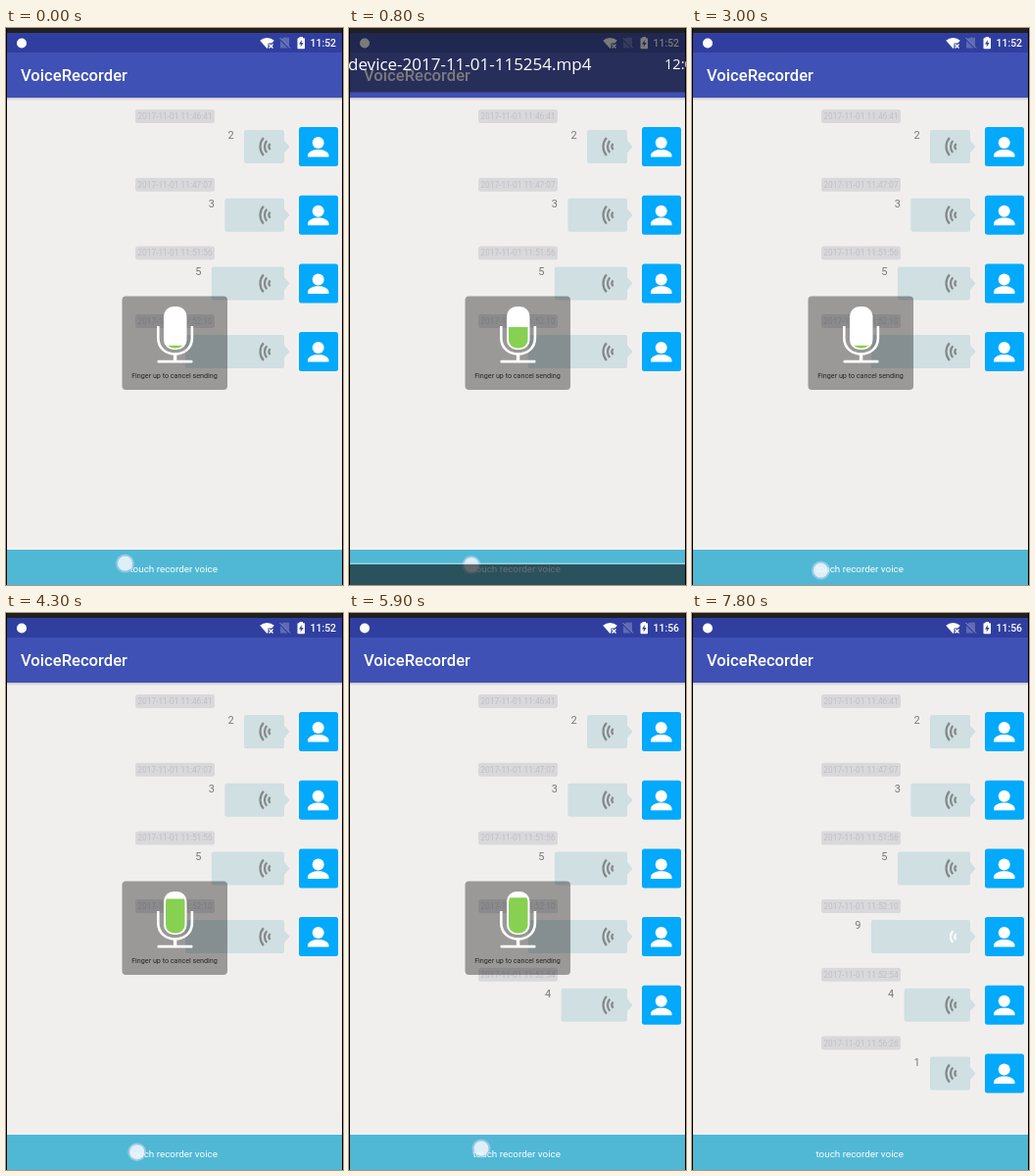
An HTML page with a canvas that plays this animation: 344x568 px, repeating every 8000 ms.

```html
<!DOCTYPE html>
<html lang="en">
<head>
<meta charset="utf-8">
<title>VoiceRecorder</title>
<style>
  html, body { margin: 0; width: 100%; height: 100%; overflow: hidden; background: #000; }
  canvas { display: block; width: 344px; height: 568px; }
</style>
</head>
<body>
<canvas id="stage"></canvas>
<script>
const W = 344, H = 568, LOOP = 8000, TICK = 100;
const canvas = document.getElementById('stage');
const ctx = canvas.getContext('2d');
const dpr = window.devicePixelRatio || 1;
canvas.width = W * dpr;
canvas.height = H * dpr;

// phase: how far the voice swell has come when the recording starts
const recordings = [
  { start: 0, end: 4600, phase: 0 },
  { start: 5100, end: 6000, phase: 620 }
];
const messages = [
  { date: '2017-11-01 11:46:41', seconds: 2, from: 0 },
  { date: '2017-11-01 11:47:07', seconds: 3, from: 0 },
  { date: '2017-11-01 11:51:56', seconds: 5, from: 0 },
  { date: '2017-11-01 11:52:10', seconds: 9, from: 0 },
  { date: '2017-11-01 11:52:54', seconds: 4, from: recordings[0].end },
  { date: '2017-11-01 11:56:26', seconds: 1, from: recordings[1].end }
];
const taps = [{ row: 1, at: 6700 }, { row: 3, at: 7100 }];

const clamp = v => Math.max(0, Math.min(1, v));
const rowY = i => 121 + i * 69.7;
const voiceLevel = ms => .07 + .83 * Math.sin(Math.PI * ms / 3000) ** 2;
const playerAlpha = t => clamp(Math.min((t - 300) / 100, (1200 - t) / 300));

function finger(t) {
  const k = clamp((t - 500) / 4600);
  return [121.5 + 13.5 * Math.sqrt(k), 546 + 7 * Math.sin(Math.PI * k)];
}

function rect(x, y, w, h, color, r = 0) {
  ctx.fillStyle = color;
  ctx.beginPath();
  ctx.roundRect(x, y, w, h, r);
  ctx.fill();
}

function poly(points, color) {
  ctx.fillStyle = color;
  ctx.beginPath();
  points.forEach(([x, y]) => ctx.lineTo(x, y));
  ctx.fill();
}

function disc(x, y, r, color) {
  ctx.fillStyle = color;
  ctx.beginPath();
  ctx.arc(x, y, r, 0, Math.PI * 2);
  ctx.fill();
}

function line(x1, y1, x2, y2, color, width) {
  ctx.strokeStyle = color;
  ctx.lineWidth = width;
  ctx.beginPath();
  ctx.moveTo(x1, y1);
  ctx.lineTo(x2, y2);
  ctx.stroke();
}

function text(str, x, y, size, color, align = 'left', weight = 400, family = 'Roboto') {
  ctx.font = `${weight} ${size}px ${family}, sans-serif`;
  ctx.textAlign = align;
  ctx.fillStyle = color;
  ctx.fillText(str, x, y);
}

function statusBar(t) {
  const bar = '#303f9f';
  rect(1, 5, 342, 20, bar);
  disc(16, 15.5, 5, '#fff');

  // Wi-Fi
  ctx.fillStyle = '#fff';
  ctx.beginPath();
  ctx.moveTo(266.5, 21);
  ctx.arc(266.5, 21, 11, -Math.PI * .73, -Math.PI * .27);
  ctx.fill();
  rect(267.5, 15.5, 6, 6, bar);
  line(268.5, 16.5, 272.5, 20.5, '#fff', 1.2);
  line(272.5, 16.5, 268.5, 20.5, '#fff', 1.2);

  // No SIM
  poly([[280, 12.5], [283, 9.8], [289, 9.8], [289, 20.5], [280, 20.5]], '#5f6bb3');
  line(279, 10.5, 289.5, 21, bar, 2);
  line(279.5, 10, 290, 20.5, '#8f98cb', 1);

  // Battery
  rect(299.5, 9, 3.5, 2, '#fff');
  rect(297.5, 10.2, 7.5, 11, '#fff', .8);
  poly([[302, 12], [299, 16.5], [301, 16.5], [300.6, 19.5], [303.6, 15], [301.6, 15]], bar);

  text(t < recordings[1].start ? '11:52' : '11:56', 337, 19, 10.4, '#fff', 'right', 500);
}

function appBar() {
  const shadow = ctx.createLinearGradient(0, 71, 0, 74);
  shadow.addColorStop(0, 'rgba(0,0,0,.18)');
  shadow.addColorStop(1, 'rgba(0,0,0,0)');
  rect(1, 71, 342, 3, shadow);
  rect(1, 25, 342, 46, '#3f51b5');
  text('VoiceRecorder', 15, 54, 16.6, '#fff', 'left', 500);
}

function waves(x, y, count, color) {
  ctx.strokeStyle = color;
  ctx.lineWidth = 2.2;
  for (let i = 1; i <= count; i++) {
    ctx.beginPath();
    ctx.arc(x, y, i * 4.5, Math.PI * .77, Math.PI * 1.23);
    ctx.stroke();
  }
}

function avatar(y) {
  rect(299, y - 20, 40, 40, '#03a9fb', 2.5);
  disc(318.7, y - 4, 6, '#fff');
  ctx.beginPath();
  ctx.moveTo(308, y + 10.5);
  ctx.lineTo(308, y + 8.5);
  ctx.bezierCurveTo(309, y + 1, 328.5, y + 1, 329.5, y + 8.5);
  ctx.lineTo(329.5, y + 10.5);
  ctx.fill();
}

function message({ date, seconds }, i, playing) {
  const y = rowY(i), bubble = '#cfdfe2';
  // Short recordings share the smallest bubble
  const left = seconds < 3 ? 243 : 243.6 - 6.75 * seconds;
  rect(132, y - 38, 81, 14, '#d9d9dc', 2.5);
  text(date, 172.5, y - 28, 8.35, '#c0c0c4', 'center');
  text(seconds, left - 13.5, y - 8, 11, '#777', 'center');
  rect(left, y - 17, 284 - left, 34, bubble, 2);
  poly([[283.5, y - 7], [289.5, y], [283.5, y + 7]], bubble);
  waves(273, y, playing || 3, playing ? '#fff' : '#858889');
  avatar(y);
}

function recorder(level) {
  rect(118.5, 273.5, 107.5, 95.5, 'rgba(0,0,0,.36)', 4);

  // Capsule and its filling
  rect(161, 284, 23.5, 44, '#fff', 10);
  ctx.save();
  ctx.beginPath();
  ctx.roundRect(163, 286, 19.5, 40.5, 8.5);
  ctx.clip();
  rect(162, 326.5 - 40.5 * level, 21, 42, '#87d051');
  ctx.restore();

  // Stand
  ctx.strokeStyle = '#fff';
  ctx.lineWidth = 2.6;
  ctx.beginPath();
  ctx.moveTo(155.3, 304);
  ctx.lineTo(155.3, 316);
  ctx.bezierCurveTo(155.3, 338, 189.9, 338, 189.9, 316);
  ctx.lineTo(189.9, 304);
  ctx.stroke();
  rect(170.9, 332, 3.4, 8, '#fff');
  rect(154.5, 338.7, 36, 2.8, '#fff', 1);

  text('Finger up to cancel sending', 172, 356.6, 7.2, '#262626', 'center');
}

function touch(x, y) {
  disc(x, y, 9.5, 'rgba(190,212,242,.6)');
  disc(x, y, 7.5, 'rgba(255,255,255,.7)');
}

function playerBars(alpha) {
  ctx.save();
  ctx.globalAlpha = alpha;
  rect(1, 5, 342, 60.5, 'rgba(20,20,20,.56)');
  rect(1, 547, 342, 21, 'rgba(20,20,20,.62)');
  rect(1, 545.5, 342, 1.5, 'rgba(205,225,230,.6)');
  text('device-2017-11-01-115254.mp4', -1, 42.5, 17, '#fff', 'left', 400, 'Open Sans');
  text('12:04', 322, 41.5, 14.6, '#fff', 'left', 400, 'Open Sans');
  ctx.restore();
}

function draw(t) {
  ctx.setTransform(dpr, 0, 0, dpr, 0, 0);
  rect(0, 0, W, H, '#000');
  rect(1, 0, 342, 5, '#202020');
  rect(1, 5, 342, 563, '#f1efee');
  statusBar(t);
  appBar();

  const tap = taps.findLast(p => t >= p.at);
  const beat = tap ? (t - tap.at) / TICK : 0;
  messages.forEach((m, i) => {
    const playing = beat > 0 && tap.row === i ? 1 + beat % 3 : 0;
    if (t >= m.from) message(m, i, playing);
  });

  rect(1, 532, 342, 36, '#50b8d4');
  text('touch recorder voice', 171.2, 555, 9.9, '#fff', 'center');

  const rec = recordings.find(r => t >= r.start && t < r.end);
  if (rec) {
    recorder(voiceLevel(t - rec.start + rec.phase));
    touch(...finger(t));
  }
  if (tap && beat < 2) touch(258.5, rowY(tap.row) - 2);
  playerBars(playerAlpha(t));
}

function tick() {
  const t = performance.now() % LOOP;
  draw(Math.floor(t / TICK) * TICK);
  requestAnimationFrame(tick);
}
tick();
</script>
</body>
</html>
```
